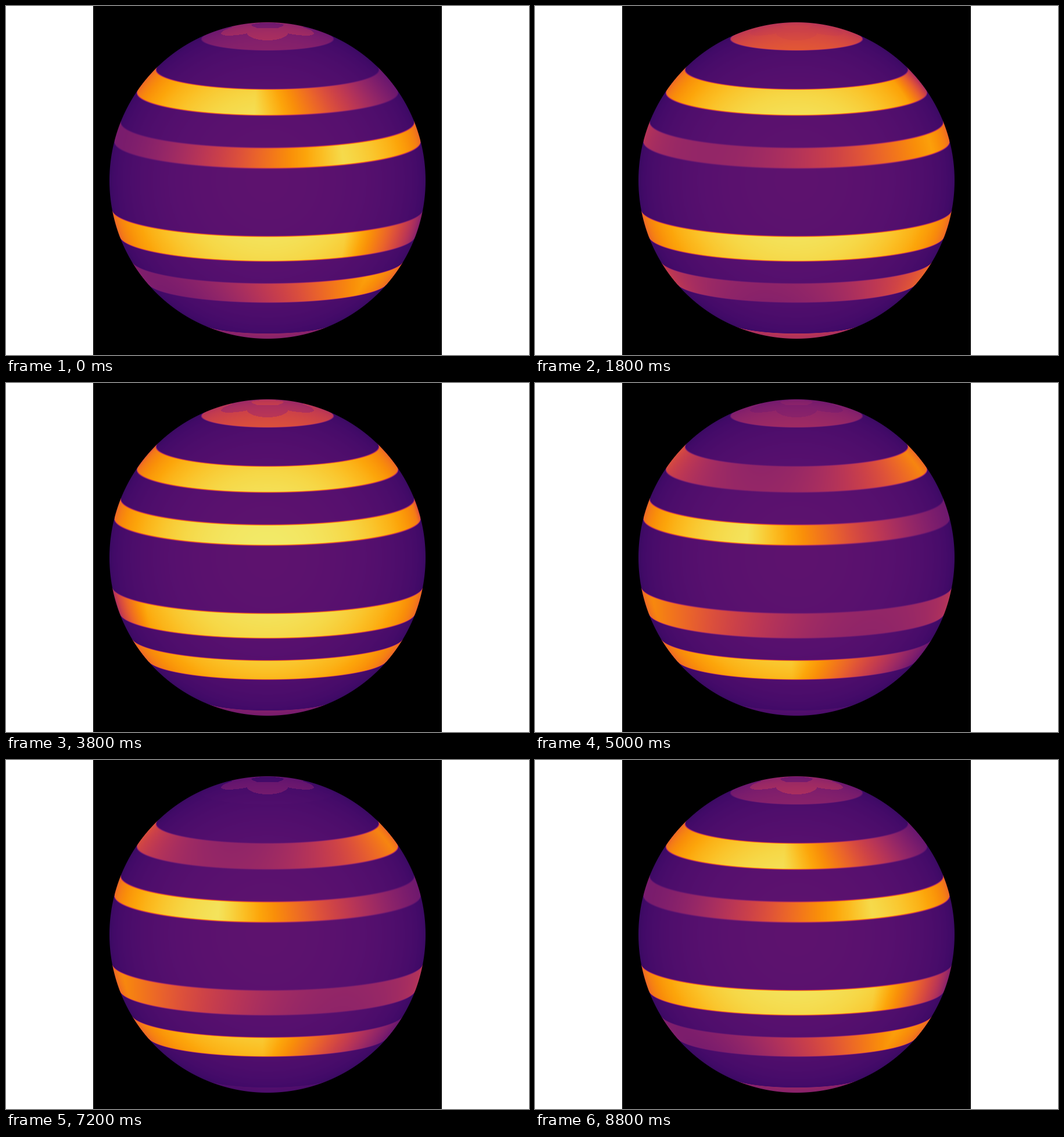
Recreate the animation shown at these times as an HTML page with a canvas. Size 900 by 600 pixels, loop 9 s.

```html
<!DOCTYPE html>
<html lang="en">
<head>
<meta charset="utf-8">
<title>Banded globe</title>
<style>
  html, body { margin: 0; width: 100%; height: 100%; overflow: hidden; background: #fff; }
  canvas { display: block; }
</style>
</head>
<body>
<canvas id="stage" width="900" height="600"></canvas>
<script>
const ctx = document.getElementById('stage').getContext('2d');
const STEP = 200, STEPS = 45, CYCLE = 44;
const CX = 450, CY = 300, R = 272, BOX = 2 * R + 4;
const RAD = Math.PI / 180, TILT = 10 * RAD;
const BASE = 0.265, PEAK = 0.95, DEPTH = 0.53, LIMB = 0.33;

// Latitude range, longitude of the bright edge, turn per step (degrees)
const TURN = 360 / 11;
const bands = [
  { lo: 34.3, hi: 45.2, edge: 174, turn: -TURN },
  { lo: 14.4, hi: 21.9, edge: 30, turn: 5 * TURN },
  { lo: -20.7, hi: -10.7, edge: 210, turn: -TURN },
  { lo: -40.5, hi: -30.6, edge: 47, turn: 5 * TURN }
];
// Areas that pulse over the whole cycle
const pulses = [
  { mean: 0.52, amp: 0.25, peak: 13.4 },  // north cap
  { mean: 0.46, amp: 0.20, peak: 8.5 },   // south cap
  { mean: 0.54, amp: 0.17, peak: 10.5 }   // polar spots
];
const NORTH = 4, SOUTH = 5, SPOT = 6, NONE = 7;
const SPOT_LAT = 78.4, CAP_LAT = 65.3;

const ramp = ['000004', '07051b', '160b39', '2a0b55', '420a68', '57106e', '6a176e',
  '7f1e6c', '932667', 'a82e5f', 'bc3754', 'cd4247', 'dd513a', 'ea642a', 'f37819',
  'f98e09', 'fca50a', 'fbbe23', 'f6d746', 'f2ea69', 'fcffa4']
  .map(h => [0, 2, 4].map(i => parseInt(h.substr(i, 2), 16)));

const LEVELS = 1024;
const lut = Array.from({ length: LEVELS + 1 }, (_, i) => {
  const p = i / LEVELS * (ramp.length - 1);
  const k = Math.min(Math.floor(p), ramp.length - 2);
  return ramp[k].map((c, j) => c + (ramp[k + 1][j] - c) * (p - k));
});

const clamp = v => Math.max(0, Math.min(1, v));
const smooth = v => { v = clamp(v); return v * v * (3 - 2 * v); };
const above = (lat, edge) => smooth((lat - edge) / 0.8 + 0.5);

function inSpot(lat, lon) {
  if (lat < 70) return false;
  const off = lon - 72 * Math.round(lon / 72);
  const dy = (lat - SPOT_LAT) / 6;
  const dx = off * Math.cos(lat * RAD) / 8.1;
  return dx * dx + dy * dy < 1;
}

function zoneAt(lat, lon) {
  if (inSpot(lat, lon)) return [SPOT, 1];
  if (lat > CAP_LAT - 1) return [NORTH, above(lat, CAP_LAT)];
  if (lat < 1 - CAP_LAT) return [SOUTH, above(-lat, CAP_LAT)];
  for (let i = 0; i < bands.length; i++) {
    const weight = above(lat, bands[i].lo) * above(-lat, -bands[i].hi);
    if (weight > 0) return [i, weight];
  }
  return [NONE, 0];
}

// Geometry of every pixel on the globe, worked out once
const N = BOX * BOX;
const zone = new Uint8Array(N), weight = new Float32Array(N), lons = new Float32Array(N);
const shade = new Float32Array(N), cover = new Float32Array(N);
const left = CX - BOX / 2, top0 = CY - BOX / 2;

for (let n = 0; n < N; n++) {
  let x = (n % BOX + 0.5 - BOX / 2) / R;
  let y = (BOX / 2 - Math.floor(n / BOX) - 0.5) / R;
  const r = Math.hypot(x, y);
  cover[n] = clamp((1 - r) * R + 0.5);
  if (!cover[n]) continue;
  if (r > 1) { x /= r; y /= r; }
  const z = Math.sqrt(Math.max(0, 1 - x * x - y * y));
  const up = y * Math.cos(TILT) + z * Math.sin(TILT);
  const near = z * Math.cos(TILT) - y * Math.sin(TILT);
  const lat = Math.asin(Math.max(-1, Math.min(1, up))) / RAD;
  lons[n] = Math.atan2(x, near);
  [zone[n], weight[n]] = zoneAt(lat, lons[n] / RAD);
  shade[n] = 1 - LIMB * (1 - z);
}

const img = ctx.createImageData(BOX, BOX);

function draw(step) {
  const edges = bands.map(b => (b.edge + b.turn * step) * RAD);
  const levels = pulses.map(p =>
    p.mean + p.amp * Math.cos((step - p.peak) / CYCLE * 2 * Math.PI));
  for (let n = 0; n < N; n++) {
    const o = n * 4;
    img.data[o + 3] = 255;
    if (!cover[n]) continue;
    const k = zone[n];
    let v = BASE;
    if (k < NORTH) {
      const lit = PEAK - DEPTH * Math.max(0, Math.sin(edges[k] - lons[n]));
      v += (lit - BASE) * weight[n];
    } else if (k < NONE) {
      v += (levels[k - NORTH] - BASE) * weight[n];
    }
    const c = lut[Math.round(clamp(v * shade[n]) * LEVELS)];
    for (let j = 0; j < 3; j++) img.data[o + j] = c[j] * cover[n];
  }
  ctx.putImageData(img, left, top0);
}

ctx.fillStyle = '#fff';
ctx.fillRect(0, 0, 900, 600);
ctx.fillStyle = '#000';
ctx.fillRect(150, 0, 600, 600);

let shown = -1;
function tick() {
  const step = Math.floor(performance.now() / STEP) % STEPS;
  if (step !== shown) draw(shown = step);
  requestAnimationFrame(tick);
}
tick();
</script>
</body>
</html>
```
